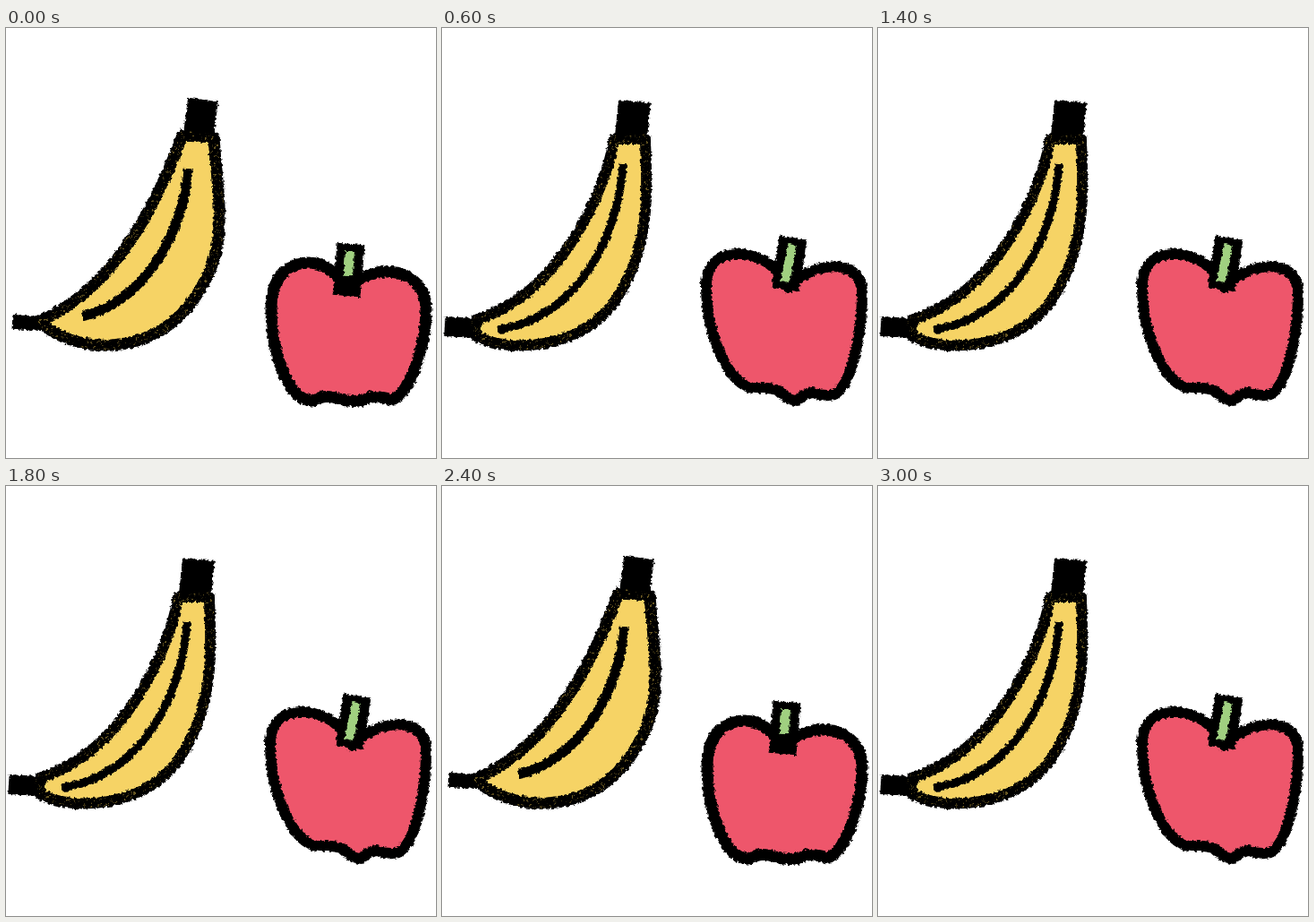
Write an HTML page that moves like this. It is 480 px wide and 480 px high and loops after 3200 ms.

```html
<!DOCTYPE html>
<html lang="en">
<head>
<meta charset="utf-8">
<title>Banana and apple</title>
<style>
  html, body { margin: 0; width: 100%; height: 100%; overflow: hidden; background: #fff; }
  svg { display: block; width: 100vw; height: 100vh; }
  path { stroke-linejoin: round; }
</style>
</head>
<body>
<svg viewBox="0 0 480 480"></svg>
<script>
const BLACK = '#000', YELLOW = '#f6d365', RED = '#ee566b', GREEN = '#a0d080', GOLD = '#6e5c24';
const svg = document.querySelector('svg');

// Centre lines of the crayon strokes in each pose.
const poses = [
  {
    banana: 'M197 120C176 174 132 285 40 326L40 330C75 362 158 369 205 309S237 199 232 122Z',
    crease: 'M203 157C200 222 157 306 85 322',
    neck: 'M220 80L215 119', neckWidth: 34,
    tip: 'M7 328L40 330', tipWidth: 16,
    apple: 'M380 293C362 248 296 250 296 312C296 360 314 416 342 416Q357 408 372 414' +
           'Q389 420 407 412Q420 411 430 415C452 410 469 350 469 314C469 268 410 258 380 293Z',
    stem: 'M385 241L380 299', stalk: 'M384 249L382 277',
    line: 13, crease_: 11
  },
  {
    banana: 'M192 124C184 178 134 296 38 326L38 344C70 362 158 362 197 299S228 170 227 124Z',
    crease: 'M202 152C198 225 157 322 62 337',
    neck: 'M215 82L211 121', neckWidth: 36,
    tip: 'M3 333L38 335', tipWidth: 22,
    apple: 'M386 290C370 245 295 235 295 287C295 345 322 403 350 402Q368 401 376 405' +
           'Q387 416 396 416Q404 408 414 407Q426 412 438 409C460 397 469 330 469 296C469 253 410 262 386 290Z',
    stem: 'M392 234L383 292', stalk: 'M391 242L383 283',
    line: 12, crease_: 9
  }
].map(({ crease_: creaseWidth, ...pose }) => ({ ...pose, creaseWidth }));

function add(parent, tag, attrs) {
  const el = document.createElementNS('http://www.w3.org/2000/svg', tag);
  for (const key in attrs) el.setAttribute(key, attrs[key]);
  return parent.appendChild(el);
}

function noiseFilter(id, seed, frequency) {
  const filter = add(svg, 'filter', {
    id, filterUnits: 'userSpaceOnUse', x: 0, y: 0, width: 480, height: 480,
    'color-interpolation-filters': 'sRGB'
  });
  add(filter, 'feTurbulence', { type: 'fractalNoise', baseFrequency: frequency, numOctaves: 2, seed, result: 'noise' });
  return filter;
}

// Ragged edges, and scattered specks of the colour underneath.
function crayonFilters(i) {
  add(noiseFilter(`rough${i}`, 4 + i, .3), 'feDisplacementMap', {
    in: 'SourceGraphic', in2: 'noise', scale: 5, xChannelSelector: 'R', yChannelSelector: 'G'
  });
  const specks = noiseFilter(`specks${i}`, 8 + i, .4);
  add(specks, 'feColorMatrix', { in: 'noise', values: '0 0 0 0 0  0 0 0 0 0  0 0 0 0 0  9 0 0 0 -5.6', result: 'mask' });
  add(specks, 'feComposite', { in: 'SourceGraphic', in2: 'mask', operator: 'in' });
}

poses.forEach((pose, i) => {
  crayonFilters(i);
  const group = add(svg, 'g', { filter: `url(#rough${i})` });
  const draw = (d, width, stroke = BLACK, fill = 'none', parent = group) =>
    add(parent, 'path', { d, stroke, fill, 'stroke-width': width });

  draw(pose.banana, pose.line, BLACK, YELLOW);
  draw(pose.neck, pose.neckWidth);
  draw(pose.tip, pose.tipWidth);
  const specks = add(group, 'g', { filter: `url(#specks${i})` });
  draw(pose.banana, pose.line - 3, GOLD, 'none', specks);
  draw(pose.crease, pose.creaseWidth);

  draw(pose.apple, pose.line, BLACK, RED);
  draw(pose.stem, 31);
  draw(pose.stalk, 10, GREEN);

  // The two poses swap every 200 ms.
  const shown = i === 0 ? [1, 0, 0] : [0, 1, 1];
  group.animate(
    shown.map((opacity, k) => ({ opacity, offset: k / 2, easing: 'step-end' })),
    { duration: 400, iterations: Infinity }
  );
});
</script>
</body>
</html>
```
